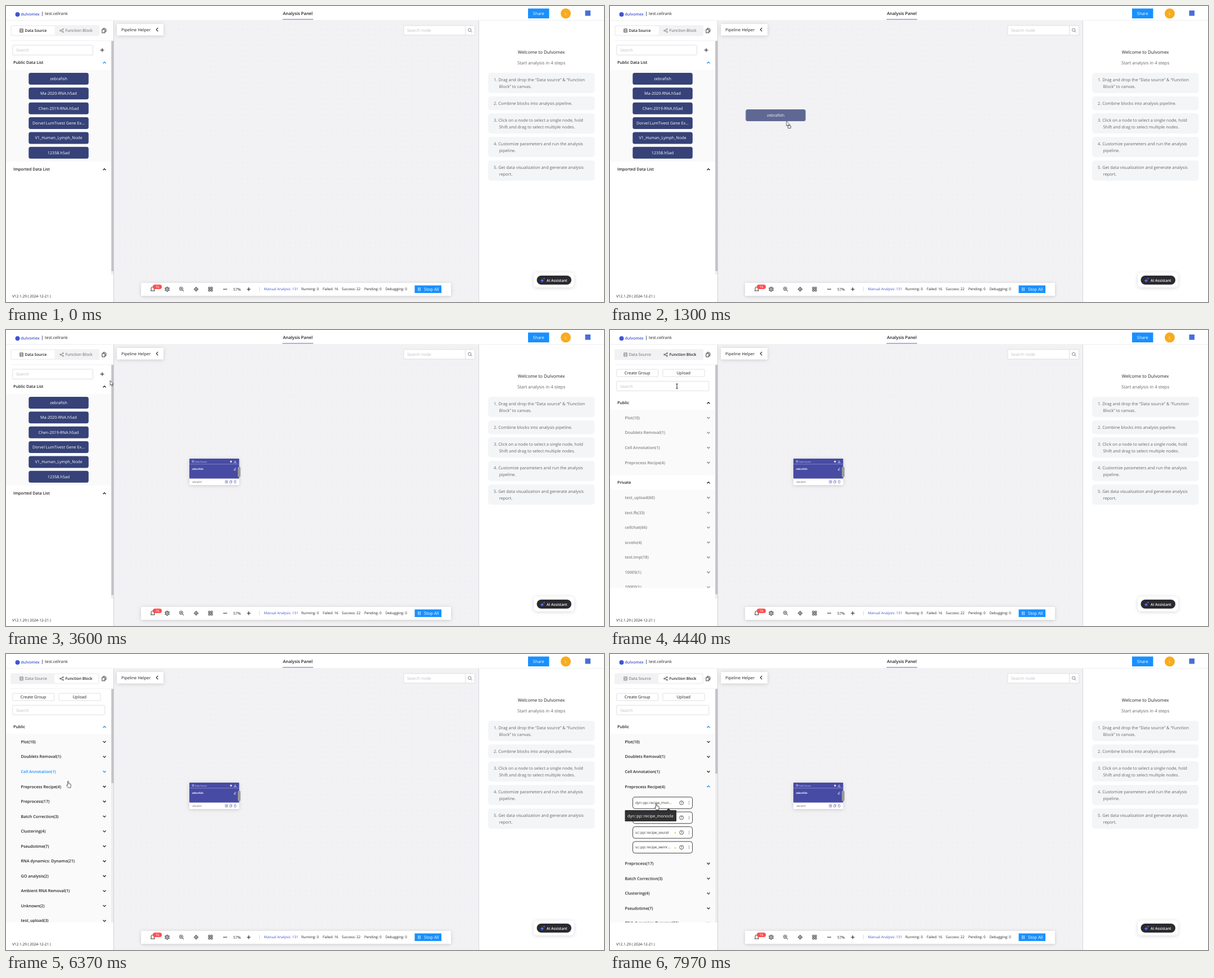
Recreate the animation shown at these times as an HTML page. Size 1063x527 px, loop 8000 ms.

```html
<!DOCTYPE html>
<html lang="en">
<head>
<meta charset="utf-8">
<title>Analysis Panel</title>
<style>
  html, body { margin: 0; width: 100%; height: 100%; overflow: hidden; background: #fff; }
  svg { display: block; width: 100vw; height: 100vh; }
  text { font-family: "Open Sans", "Noto Sans", sans-serif; text-rendering: geometricPrecision; white-space: pre; }
  .raised { filter: drop-shadow(0 1px 3px rgba(0, 0, 0, .16)); }
</style>
</head>
<body>
<svg id="stage" viewBox="0 0 1063 527" xmlns="http://www.w3.org/2000/svg"></svg>
<script>
const LOOP = 8000, SWITCH = 4330;
const INK = '#222', BLUE = '#1890ff', NAVY = '#364278', GREY = '#666', HINT = '#bfbfbf', PALE = '#fafafb';

// Drawing helpers; text is placed by its vertical centre.
const text = (x, cy, s, size, fill = INK, weight = 400, anchor = 'start', more = '') =>
  `<text x="${x}" y="${cy + size * .36}" font-size="${size}" fill="${fill}" font-weight="${weight}" text-anchor="${anchor}" ${more}>${s}</text>`;
const mid = (x, cy, s, size, fill, weight) => text(x, cy, s, size, fill, weight, 'middle');
const rect = (x, y, w, h, fill, r = 0, more = '') =>
  `<rect x="${x}" y="${y}" width="${w}" height="${h}" fill="${fill}" rx="${r}" ${more}/>`;
const box = (x, y, w, h, stroke = '#d9d9d9', r = 1) => rect(x, y, w, h, '#fff', r, `stroke="${stroke}" stroke-width=".8"`);
const line = (d, stroke = INK, width = 1, more = '') =>
  `<path d="${d}" fill="none" stroke="${stroke}" stroke-width="${width}" ${more}/>`;
const at = (x, y, s, scale = 1) => `<g transform="translate(${x} ${y}) scale(${scale})">${s}</g>`;
const group = (id, s, more = '') => `<g id="${id}" ${more}>${s}</g>`;
const ring = (r, stroke = INK, width = .9) => `<circle r="${r}" fill="none" stroke="${stroke}" stroke-width="${width}"/>`;

const icon = {
  data: c => line('M-3-3.5H3V3.5H-3ZM-3-1.2H3M-3 1.2H3', c, .8),
  share: c => line('M2.5-2.5L-2.5 0L2.5 2.5', c, .8) +
    [[2.5, -2.5], [-2.5, 0], [2.5, 2.5]].map(([x, y]) => at(x, y, `<circle r="1.1" fill="#fff" stroke="${c}" stroke-width=".8"/>`)).join(''),
  copy: c => line('M-1.5-2V-4H2L3.5-2.5V2H1.5M-3.5-2H1.5V4H-3.5Z', c, .9),
  plus: c => line('M-3.3 0H3.3M0-3.3V3.3', c, 1.1),
  zoom: c => at(-.6, -.6, ring(3, c)) + line('M1.6 1.6L4 4', c, 1),
  spark: c => `<path d="M0-4Q.4-.4 4 0Q.4.4 0 4Q-.4.4-4 0Q-.4-.4 0-4Z" fill="${c}"/>`,
  down: c => line('M0-3V1.5M-1.8-.2L0 1.6L1.8-.2M-3 1.5V3.2H3V1.5', c, .8),
  edit: c => line('M-2 1.2L1.5-2.5L2.6-1.4L-.9 2.2L-2.2 2.4ZM-3 3.6H3', c, .8),
  bin: c => line('M-3-2.2H3M-1-3.3H1M-2.2-2.2V3.2H2.2V-2.2', c, .8),
};
const chevron = (y, dir, id = '', stroke = INK) =>
  at(175, y, line(`M-2.5-1.2L0 1.3L2.5-1.2`, stroke, 1.3, `${id && `id="${id}"`} style="transform:scaleY(${dir})"`));

function header() {
  return rect(0, 0, 1063, 26, '#fff') + rect(0, 25.5, 1063, .8, '#e4e4e8') +
    '<circle cx="20.5" cy="15" r="4" fill="#3f55d8"/>' + text(26.5, 14.5, 'dulvomex', 7, '#3f55d8', 600) +
    rect(64, 10, .8, 8, '#444') + text(69, 13.5, 'test.cellrank', 7.25) +
    mid(518.7, 13.5, 'Analysis Panel', 7.7, INK, 600) + rect(491.5, 23.3, 54.5, 1, '#5b62cf') +
    rect(928, 4.5, 37.5, 17.5, BLUE) + mid(946.7, 13.5, 'Share', 7.4, '#fff') +
    '<circle cx="995" cy="13.3" r="9" fill="#f8ab1f"/>' + mid(995, 13.3, 'L', 6.5, '#fff') +
    rect(1029.5, 8, 9.5, 9.5, '#4a6fd8');
}

function canvasArea() {
  return rect(191, 26.3, 649, 501, '#f2f2f4') + rect(191, 26.3, 649, 501, 'url(#dots)') +
    rect(197, 32, 83, 20.5, '#fff', 1, 'class="raised"') + text(205, 42.3, 'Pipeline Helper', 7.35) +
    line('M270.2 38.8L267.2 42L270.2 45.2', INK, 1.1) +
    box(707, 34.8, 109.5, 17) + text(713, 43.5, 'Search node', 7.35, HINT) +
    box(816.5, 34.8, 17, 17) + at(824.7, 43.2, icon.zoom('#666'), .9);
}

function toolbar() {
  const stats = [[458.5, 'Manual Analysis: 131'], [525, 'Running: 0'], [563, 'Failed: 16'], [597, 'Success: 22'], [637, 'Pending: 0'], [674.5, 'Debugging: 0']];
  return rect(240, 493, 551, 23, '#fff', 1, 'class="raised"') +
    line('M258 507V503A2.8 2.8 0 0 1 263.6 503V507M257 507H264.6', INK, .9) +
    rect(261, 496, 16, 8, '#ff4d4f', 4) + mid(269, 500, '16', 6, '#fff') +
    at(286.5, 504.2, ring(1.4) + ring(3.3) + line('M0-4.5V-3M0 3V4.5M-4-2.3L-2.7-1.5M4 2.3L2.7 1.5M-4 2.3L-2.7 1.5M4-2.3L2.7-1.5', INK, 1.3)) +
    at(312, 504, icon.zoom(INK) + line('M-2-.6H.8M-.6-2V.8', INK, .8)) +
    at(338, 504.2, ring(2.7) + '<circle r="1"/>' + line('M0-4.3V-2M0 2V4.3M-4.3 0H-2M2 0H4.3', INK, .9)) +
    at(363.5, 504.2, line('M-3.5-3.5H-.7V-.7H-3.5ZM.7-3.5H3.5V-.7H.7ZM-3.5.7H-.7V3.5H-3.5ZM.7.7H3.5V3.5H.7Z', INK, .9)) +
    line('M386 504.2H393.2', INK, 1) + mid(410.7, 504.2, '57%', 6.8) + at(431.5, 504.2, icon.plus(INK)) +
    rect(450, 500, .7, 8, '#c9c9d6') +
    stats.map(([x, s], i) => text(x, 504.2, s, 6.25, i ? INK : '#3f55c8')).join('') +
    rect(726.5, 497.5, 47.5, 13.5, BLUE) + line('M733 501V507.4M736 501V507.4', '#fff', 1.1) + text(743, 504.4, 'Stop All', 7.55, '#fff');
}

function helpPanel() {
  const cards = [
    [119, '1. Drag and drop the “Data source” &amp; “Function', 'Block” to canvas.'],
    [161, '2. Combine blocks into analysis pipeline.'],
    [191, '3. Click on a node to select a single node, hold', 'Shift and drag to select multiple nodes.'],
    [233, '4. Customize parameters and run the analysis', 'pipeline.'],
    [275, '5. Get data visualization and generate analysis', 'report.']];
  return rect(840, 26.3, 223, 501, '#fff') + rect(840, 26.3, .9, 501, '#d3d3d8') +
    mid(951.7, 82.5, 'Welcome to Dulvomex', 8) + mid(951.5, 100.7, 'Start analysis in 4 steps', 7.85, GREY) +
    cards.map(([y, a, b]) => rect(857, y, 189.5, b ? 36 : 24.5, '#f4f5f7', 5) +
      text(867, y + 12.3, a, 7.45, GREY) + (b ? text(876.5, y + 24.4, b, 7.45, GREY) : '')).join('') +
    rect(938, 474.5, 72, 26.5, '#fff', 6, 'class="raised"') + rect(943.5, 480, 61.5, 16, '#2a2a2f', 8) +
    at(953, 489, icon.spark('#5b6cf0')) + at(956.5, 485.3, icon.spark('#8d6cf0'), .45) +
    text(961, 488.2, 'AI Assistant', 6.5, '#fff', 600);
}

function tabs(onData) {
  const look = on => on ? [INK, 600] : [GREY, 400];
  const [a, aw] = look(onData), [b, bw] = look(!onData);
  return rect(8, 34, 158, 19.5, '#f2f2f4', 3) +
    (onData ? rect(10, 36, 76.5, 15.5, '#fff', 2) : rect(86, 36, 78, 15.5, '#fff', 2, 'id="thumb"')) +
    at(27.5, 43.8, icon.data(a), .9) + text(33.5, 43.9, 'Data Source', onData ? 6.7 : 7, a, aw) +
    at(99, 43.8, icon.share(b), .95) + text(105.5, 43.9, 'Function Block', onData ? 7.1 : 6.75, b, bw);
}

const pill = (x, y, s) => rect(x, y, 106.5, 21, NAVY, 3.5) + mid(x + 53.2, y + 10.5, s, 7.2, '#fff');

function dataPanel() {
  const files = ['zebrafish', 'Ma-2020-RNA.h5ad', 'Chen-2019-RNA.h5ad', 'Dorvel LumTivest Gene Ex...', 'V1_Human_Lymph_Node', '12358.h5ad'];
  return tabs(true) + box(11.8, 69.8, 142.7, 17.5) + text(18, 78.7, 'Search', 7.2, HINT) + at(171, 78.5, icon.plus(INK)) +
    text(13, 100.8, 'Public Data List', 7.2, INK, 600) + group('dataArrow', chevron(101, -1, '', 'currentColor')) +
    rect(0, 114, 187, 163, PALE) + files.map((s, i) => pill(40.3, 119 + i * 26.35, s)).join('') +
    text(13, 290.8, 'Imported Data List', 7.2, INK, 600) + chevron(291, -1);
}

const ROW = 26.55;
const row = (s, cy, i) => `<g class="row" id="${i}" color="${INK}">` +
  text(26.5, cy, s, 7.2, 'currentColor', 600) + chevron(cy, 1, i === 'row3' ? 'recipeArrow' : '', 'currentColor') + '</g>';

function recipe(s, i) {
  const y = 265 + i * 26.4;
  return rect(40.5, y - 10.3, 106, 20.6, '#fff', 4, 'stroke="#333" stroke-width=".9"') + text(45, y, s, 6.3, '#333') +
    (i ? text(114.3, y + .3, 'v', 6, '#e0b021', 600) : '') +
    at(127.2, y, ring(3.5, '#333', .8)) + mid(127.2, y, '?', 5.4, '#333', 600) +
    [-2.3, 0, 2.3].map(d => `<circle cx="140.5" cy="${y + d}" r=".6" fill="#444"/>`).join('');
}

function functionPanel() {
  const shared = ['Plot(10)', 'Doublets Removal(1)', 'Cell Annotation(1)', 'Preprocess Recipe(4)', 'Preprocess(17)', 'Batch Correction(3)', 'Clustering(4)',
    'Pseudotime(7)', 'RNA dynamics: Dynamo(21)', 'GO analysis(2)', 'Ambient RNA Removal(1)', 'Unknown(2)', 'test_upload(3)'];
  const own = ['test_upload(60)', 'test.fb(33)', 'cellchat(66)', 'scvelo(4)', 'test.tmp(18)', '10005(1)', '10005(1)'];
  const recipes = ['dyn::pp::recipe_mon...', 'sc::pp::recipe_zheng...', 'sc::pp::recipe_seurat', 'sc::pp::recipe_weinr...'];
  const rows = shared.map((s, i) => row(s, 156.3 + i * ROW, 'row' + i));
  return tabs(false) + box(11.8, 70, 73.7, 13) + mid(48.7, 76.6, 'Create Group', 7.3) + box(93.8, 70, 74.2, 13) + mid(130.8, 76.6, 'Upload', 7.3) +
    box(11.8, 91.3, 164, 17) + text(18, 100, 'Search', 7.2, HINT) +
    text(13, 129.7, 'Public', 7.2, INK, 600) + group('publicArrow', chevron(130, -1, '', 'currentColor')) +
    '<g clip-path="url(#listClip)">' +
    rect(0, 142, 187, 340, PALE) + rows.slice(0, 4).join('') + recipes.map(recipe).join('') +
    group('rest', rect(0, 249.4, 187, 260, PALE) + rows.slice(4).join('')) +
    group('own', rect(0, 142, 187, 25, '#fff') + rect(0, 167, 187, 400, PALE) + text(13, 154.7, 'Private', 7.2, INK, 600) + chevron(155, -1) +
      own.map((s, i) => row(s, 181.5 + i * ROW, 'own' + i)).join('') + group('ownEnd', rect(0, 167, 187, 500, '#fff'))) +
    '</g>';
}

function node() {
  const tint = '#dfe2ff', foot = '#5558a8';
  return rect(326, 229, 88.5, 47, '#fff', 1.5, 'class="raised"') + rect(326, 229, 88.5, 35.5, '#474ba4', 1) +
    rect(326, 238.5, 88.5, .7, '#9a9de0') +
    at(332.5, 234, icon.data(tint), .5) + text(336, 234.2, 'Data Source', 3.75, tint) +
    at(400, 234.3, icon.spark('#fff'), .65) + at(407.3, 234.2, icon.down('#fff'), .7) +
    text(330.5, 247.2, 'zebrafish', 4.45, '#fff', 700) + at(407, 247.2, icon.edit('#fff'), .7) +
    text(331, 270.3, 'zebrafish', 4.2, '#555', 400, 'start', 'font-style="italic"') +
    at(392, 270.3, line('M-3-3H3V3H-3ZM-1.5 0H1.5M0-1.5V1.5', foot, .9), .7) + at(399.7, 270.3, icon.copy(foot), .6) + at(407.3, 270.3, icon.bin(foot), .7) +
    rect(412, 243.5, 4.8, 18.5, '#98989c', 2);
}

const arrow = '<path d="M0 0V8.6L2 6.8L3.4 9.8L4.7 9.2L3.4 6.4H6Z" fill="#fff" stroke="#222" stroke-width=".7"/>';
const outline = 'fill="#fff" stroke="#222" stroke-width=".8" stroke-linejoin="round"';
const cursors = {
  drag: `<g opacity=".78">${pill(-72.5, -21, 'zebrafish')}</g>` + arrow + rect(2.5, 8, 5, 4.5, '#fff', .5, 'stroke="#222" stroke-width=".8"'),
  grab: `<path d="M-2.5 5L-4.8 1Q-5-.5-3 .6V-3Q-2-4.4-1.2-3.4V-4.3Q0-5.6.9-4.2V-3.6Q2.2-4.7 2.9-3V-2.2Q4.4-3 4.6-1.2Q4.6 2.5 3 5Z" ${outline}/>`,
  arrow,
  hand: `<path d="M-.3 0Q1 -.6 1.2 .8V4.2L4 4.8Q5.4 5 5.3 6.8L4.5 11.5H.3L-2.6 7.4Q-2.4 5.8-.6 7V.8Z" ${outline}/>`,
  beam: line('M-1.8-4H1.8M-1.8 4H1.8M0-4V4', '#111', .9),
};

const stage = document.getElementById('stage');
stage.innerHTML = `<defs>
  <pattern id="dots" width="9.45" height="9.45" patternUnits="userSpaceOnUse"><circle cx="4" cy="4" r=".5" fill="#dcdde2"/></pattern>
  <clipPath id="listClip"><rect y="142" width="187" height="336"/></clipPath></defs>` +
  canvasArea() + group('node', node()) + header() + helpPanel() + toolbar() +
  rect(0, 26.3, 191, 501, '#fff') + rect(8, 61.5, 179, .7, '#ececf0') + at(174.3, 43.8, icon.copy(INK)) +
  group('data', dataPanel()) + group('functions', functionPanel()) +
  rect(187, 62, 4.2, 416, '#ededf0') + rect(187.3, 62, 3.7, 410, '#c2c2c6', 0, 'id="scroll"') + rect(191, 26.3, .9, 501, '#cfcfd4') +
  text(11, 516.5, 'V12.1.29 ( 2024-12-21 )', 6.5) +
  group('tip', line('M104 274.5L107 278H101Z', 'none', 0, 'style="fill:#29292b"') + rect(26.5, 278, 91.5, 20, '#29292b', 1) + text(31, 288.3, 'dyn::pp::recipe_monocle', 7.2, '#fff'), 'opacity=".96"') +
  group('cursor', Object.entries(cursors).map(([id, s]) => group('cursor-' + id, s)).join(''));

// Timelines: lists of [ms, value], held flat before the first and after the last entry.
function play(id, prop, steps, easing = 'linear') {
  const all = [[0, steps[0][1]], ...steps, [LOOP, steps.at(-1)[1]]];
  document.getElementById(id).animate(all.map(([t, v]) => ({ offset: t / LOOP, [prop]: v, easing })), { duration: LOOP, iterations: Infinity });
}
const jump = (id, prop, steps) => play(id, prop, steps, 'step-end');
const slideY = (id, steps) => play(id, 'transform', steps.map(([t, y]) => [t, `translate(0px, ${y}px)`]));
const hover = (id, from, to) => play(id, 'color', [[from, INK], [from + 100, BLUE], [to, BLUE], [to + 180, INK]]);

jump('node', 'opacity', [[0, 0], [2040, 1]]);
jump('data', 'opacity', [[0, 1], [SWITCH, 0]]);
jump('functions', 'opacity', [[0, 0], [SWITCH, 1]]);
play('dataArrow', 'color', [[2080, BLUE], [2300, INK]]);

play('thumb', 'opacity', [[4520, 0], [4620, 1]]);
slideY('own', [[SWITCH, 0], [4440, 115.5], [4600, 340]]);
slideY('ownEnd', [[SWITCH, 0], [4440, 173.5], [4600, 420]]);
document.querySelectorAll('.row').forEach(r => play(r.id, 'opacity', [[SWITCH, 0], [4440, .55], [4600, 1]]));
play('scroll', 'height', [[4440, '410px'], [4600, '168px'], [6960, '168px'], [7040, '156px'], [7120, '151px']]);

play('publicArrow', 'color', [[4700, INK], [4850, BLUE]]);
hover('row0', 5300, 5400);
hover('row1', 5380, 5480);
hover('row2', 5560, 6400);
play('row3', 'color', [[6420, INK], [6520, BLUE]]);
const recipeLabel = document.querySelector('#row3 text');
recipeLabel.id = 'recipeLabel';
play('recipeLabel', 'fill', [[6420, INK], [6520, BLUE], [7160, BLUE], [7340, INK]]);
slideY('rest', [[6960, 0], [7040, 80], [7120, 110.5]]);
play('recipeArrow', 'transform', [[6960, 'scaleY(1)'], [7040, 'scaleY(0)'], [7120, 'scaleY(-1)']]);
play('tip', 'opacity', [[7780, 0], [7900, .96]]);

const path = [[40, 112, 140], [670, 162, 149], [840, 162, 149], [1300, 313.5, 205], [1540, 360, 220], [2040, 360, 220], [2300, 343.5, 218.5],
  [2770, 343.5, 218.5], [3540, 195, 98], [3950, 128, 44], [4300, 126, 46], [4440, 119, 100], [4650, 119, 122], [5270, 118, 130],
  [5540, 113, 208], [5840, 112, 217], [6100, 112, 217], [6840, 107, 243], [6940, 107, 243], [7040, 104.5, 248], [7600, 82, 266]];
play('cursor', 'transform', path.map(([t, x, y]) => [t, `translate(${x}px, ${y}px)`]));

const shown = [[0, ''], [40, 'drag'], [2040, 'grab'], [3550, 'arrow'], [3750, 'hand'], [4400, 'beam'], [4580, 'hand'], [7000, 'arrow'], [7200, 'hand']];
for (const kind in cursors) jump('cursor-' + kind, 'opacity', shown.map(([t, k]) => [t, k === kind ? 1 : 0]));
</script>
</body>
</html>
```
